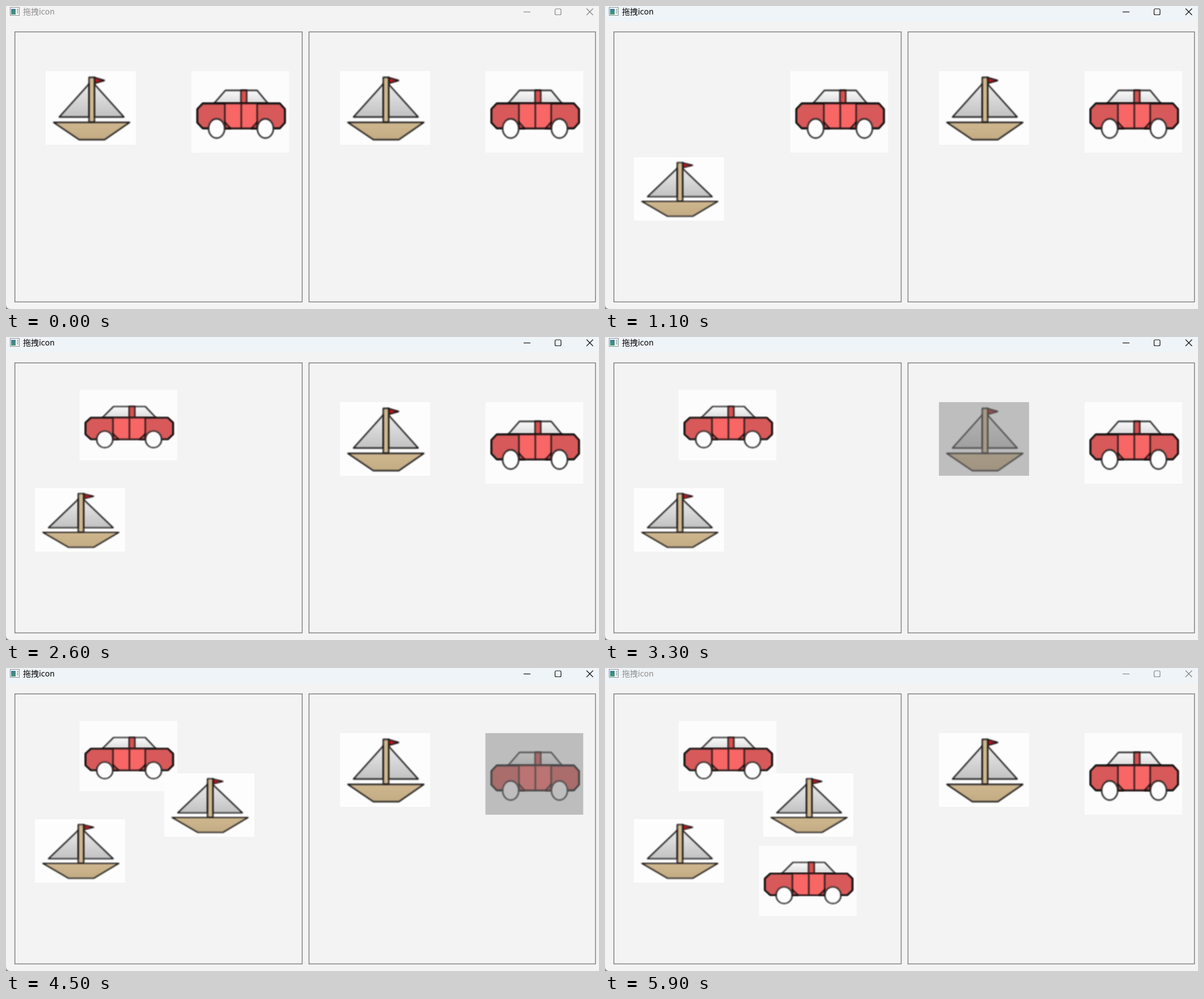
Animation of 1046x535 px, one loop 6000 ms. Source, as an HTML page with a canvas:

```html
<!DOCTYPE html>
<html lang="zh">
<head>
<meta charset="utf-8">
<title>拖拽icon</title>
<style>
html, body { margin: 0; width: 100%; height: 100%; overflow: hidden; background: #f3f3f3; }
canvas { display: block; }
</style>
</head>
<body>
<canvas id="stage" width="1046" height="535"></canvas>
<script>
const ctx = document.getElementById('stage').getContext('2d');
const LOOP = 6000;
const STEPS = [0, 600, 1100, 2100, 2600, 3300, 3800, 4500, 5200, 5900];
const LINE = '#141212';

function poly(points, fill, open) {
  ctx.beginPath();
  points.forEach(([x, y]) => ctx.lineTo(x, y));
  if (!open) ctx.closePath();
  if (fill) {
    ctx.fillStyle = fill;
    ctx.fill();
  }
  ctx.stroke();
}

function box(x, y, w, h, fill) {
  ctx.fillStyle = fill;
  ctx.fillRect(x, y, w, h);
}

function shade(y0, y1, top, bottom) {
  const g = ctx.createLinearGradient(0, y0, 0, y1);
  g.addColorStop(0, top);
  g.addColorStop(1, bottom);
  return g;
}

function boat() {
  const sail = shade(20, 81, '#ececec', '#c2c2c2');
  poly([[77, 22], [77, 81], [24, 81]], sail);
  poly([[85, 22], [85, 81], [138, 81]], sail);
  poly([[86, 11.5], [103.5, 16.5], [86, 21.5]], '#d00d1c');
  poly([[76.5, 11], [86, 11], [86, 90.5], [76.5, 90.5]], '#d0b88e');
  poly([[14, 90.5], [148, 90.5], [104, 121], [59, 121]], shade(90, 121, '#cfb78f', '#c3ab83'));
}

function wheel(x) {
  ctx.beginPath();
  ctx.ellipse(x, 101.3, 14.2, 17, 0, 0, Math.PI * 2);
  ctx.fillStyle = '#fefefe';
  ctx.fill();
  ctx.stroke();
}

function car() {
  const body = [[10.5, 67], [20, 57], [156, 57], [165, 67], [165, 91], [156, 101], [20, 101], [10.5, 91]];
  poly([[40, 57], [60, 34], [116, 34], [135, 57]], shade(34, 57, '#fafafa', '#dcdcdc'));
  poly([[87.5, 34], [97.5, 34], [97.5, 57], [87.5, 57]], '#dc5050');
  poly(body, '#d85959');
  box(59, 57, 57, 44, '#f86666');
  poly(body);
  for (const x of [59, 88, 116]) poly([[x, 57], [x, 101]], null, true);
  poly([[59, 90], [69, 101], [59, 101]], '#c94b4b');
  poly([[116, 90], [106, 101], [116, 101]], '#c94b4b');
  wheel(44.5);
  wheel(130.5);
}

const BOAT = { w: 159, h: 130, paper: '#fdfdfd', draw: boat };
const CAR = { w: 172.5, h: 144, paper: '#fcfcfc', draw: car };

function icon(kind, x, y, { flat = false, held = false } = {}) {
  ctx.save();
  ctx.translate(x, y);
  if (flat) ctx.scale(1, 0.861);
  box(0, 0, kind.w, kind.h, kind.paper);
  ctx.strokeStyle = LINE;
  ctx.lineWidth = 2.4;
  ctx.lineJoin = 'round';
  ctx.filter = 'blur(0.9px)';
  kind.draw();
  ctx.filter = 'none';
  if (held) box(0, 0, kind.w, kind.h, 'rgba(128,128,128,0.5)');
  ctx.restore();
}

function panel(x, y, w, h) {
  ctx.lineWidth = 1;
  ctx.strokeStyle = '#fff';
  ctx.strokeRect(x + 1.3, y + 1.3, w, h);
  ctx.lineWidth = 1.5;
  ctx.strokeStyle = '#7e7e7e';
  ctx.strokeRect(x, y, w, h);
}

function titleBar(step) {
  const active = step > 0 && step < 9;
  if (step > 0) box(0, 0, 1046, 27, '#eff4f9');

  box(7, 2, 17, 15, '#fbfbfb');
  ctx.lineWidth = 1;
  ctx.strokeStyle = '#858b8e';
  ctx.strokeRect(7.5, 2.5, 16, 14);
  box(9, 5, 8, 10, shade(5, 15, '#3f7d9c', '#3f9a72'));
  for (const y of [5, 8, 11]) box(19, y, 3, 2, '#a9aeb0');

  ctx.fillStyle = active ? '#000' : '#8c8c8c';
  ctx.font = '14px "Noto Sans CJK SC", "Noto Sans CJK", sans-serif';
  ctx.fillText('拖拽icon', 30, 15);

  ctx.strokeStyle = active ? '#111' : '#858585';
  ctx.lineWidth = 1.2;
  poly([[913, 10.5], [925, 10.5]], null, true);
  ctx.beginPath();
  ctx.roundRect(968.5, 5, 10.5, 10.5, 2);
  ctx.stroke();
  poly([[1024, 4.5], [1035.5, 16]], null, true);
  poly([[1035.5, 4.5], [1024, 16]], null, true);
}

function corner() {
  ctx.beginPath();
  ctx.moveTo(0, 527);
  ctx.quadraticCurveTo(0, 535, 8, 535);
  ctx.lineTo(0, 535);
  ctx.fillStyle = '#858585';
  ctx.fill();
}

function draw(step) {
  const flat = { flat: true };
  box(0, 0, 1046, 535, '#f3f3f3');
  titleBar(step);
  panel(15.7, 45.7, 506.8, 476.8);
  panel(534.5, 45.7, 505.3, 476.8);
  corner();

  if (step < 2) icon(BOAT, 70, 115, { held: step === 1 });
  else icon(BOAT, 51, 267, flat);

  if (step < 4) icon(CAR, 327, 115, { held: step === 3 });
  else icon(CAR, 129.7, 93.5, flat);

  icon(BOAT, 589, 115, { held: step === 5 });
  icon(CAR, 845.7, 115, { held: step === 7 });
  if (step >= 6) icon(BOAT, 279, 186, flat);
  if (step >= 8) icon(CAR, 271.5, 314, flat);
}

let shown = -1;
const start = performance.now();

function tick() {
  const t = (performance.now() - start) % LOOP;
  const step = STEPS.filter(s => s <= t).length - 1;
  if (step !== shown) draw(shown = step);
  requestAnimationFrame(tick);
}
tick();
</script>
</body>
</html>
```
